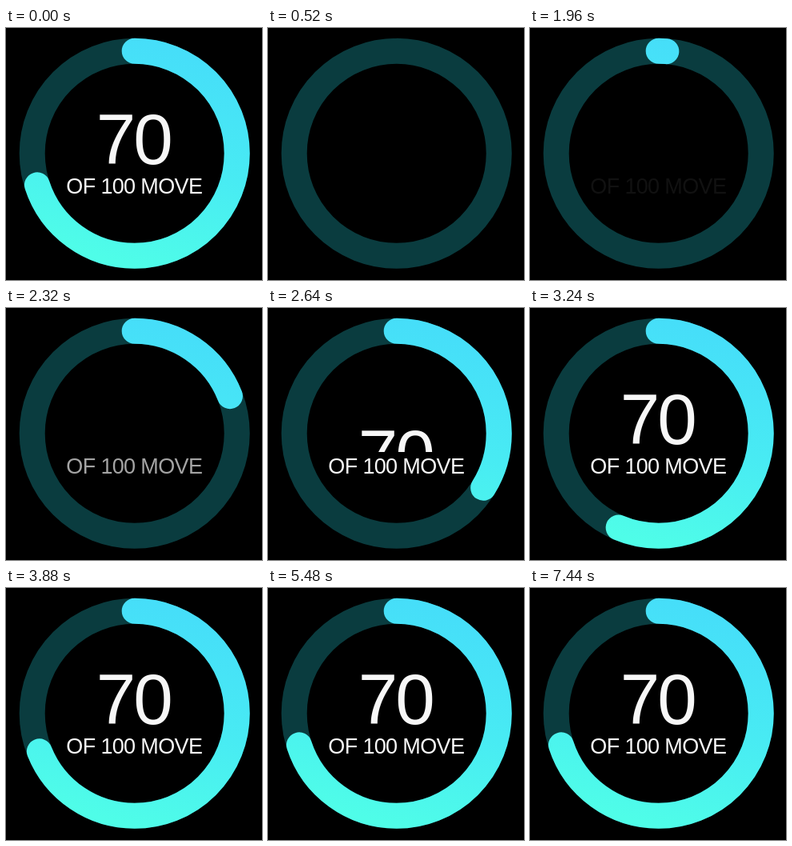
Recreate the animation shown at these times as an HTML page. Size 320x315 px, loop 7.56 s.

```html
<!DOCTYPE html>
<html lang="en">
<head>
<meta charset="utf-8">
<title>Move ring</title>
<style>
  html, body { margin: 0; width: 100%; height: 100%; overflow: hidden; background: #000; }
  svg { display: block; width: 320px; height: 315px; }
  path { fill: none; stroke-width: 32; }
  text { fill: #f7f7f7; text-anchor: middle; font-family: "Liberation Sans", Arial, sans-serif; }
  #count { font-size: 89px; letter-spacing: -3px; }
  #label { font-size: 27px; letter-spacing: -.65px; }
</style>
</head>
<body>
<svg viewBox="0 0 320 315">
  <defs>
    <linearGradient id="glow" gradientUnits="userSpaceOnUse" x1="190" y1="20" x2="115" y2="285">
      <stop offset="0" stop-color="#46def9"/>
      <stop offset=".5" stop-color="#48ebf3"/>
      <stop offset="1" stop-color="#4ffde8"/>
    </linearGradient>
    <clipPath id="window"><rect x="60" y="90" width="200" height="90"/></clipPath>
  </defs>
  <path stroke="#0a3c3f" d="M160.7 28.8a128 128 0 1 1 0 256a128 128 0 1 1 0-256"/>
  <path id="arc" stroke="url(#glow)" stroke-linecap="round" pathLength="100"
        d="M160.7 28.8a128 128 0 1 1 0 256a128 128 0 1 1 0-256"/>
  <g clip-path="url(#window)"><text id="count" x="159.3" y="170">70</text></g>
  <text id="label" x="160.3" y="206.8">OF 100 MOVE</text>
</svg>
<script>
  const LOOP = 7560, STEP = 40, GOAL = 70;
  const FADE_OUT = [400, 120], FILL = [1936, 2186], FADE_IN = [1920, 600], RISE = [2340, 700];
  const [arc, count, label] = ['arc', 'count', 'label'].map(id => document.getElementById(id));

  const span = (t, [start, length]) => Math.min(1, Math.max(0, (t - start) / length));
  const sineOut = u => Math.sin(u * Math.PI / 2);
  const sineInOut = u => (1 - Math.cos(u * Math.PI)) / 2;

  function draw(t) {
    const leaving = t < 1000;
    const out = 1 - span(t, FADE_OUT);
    const fill = leaving ? 1 : sineOut(span(t, FILL));
    const rise = leaving ? 1 : sineInOut(span(t, RISE));

    arc.style.opacity = leaving ? out : fill > 0 ? 1 : 0;
    arc.setAttribute('stroke-dasharray', `${GOAL * fill} 200`);
    count.style.opacity = leaving ? out : rise > 0 ? 1 : 0;
    count.setAttribute('transform', `translate(0 ${73 * (1 - rise)})`);
    label.style.opacity = leaving ? out : span(t, FADE_IN);
  }

  const begin = performance.now();
  function tick() {
    const t = (performance.now() - begin) % LOOP;
    draw(Math.floor(t / STEP) * STEP);
    requestAnimationFrame(tick);
  }
  tick();
</script>
</body>
</html>
```
